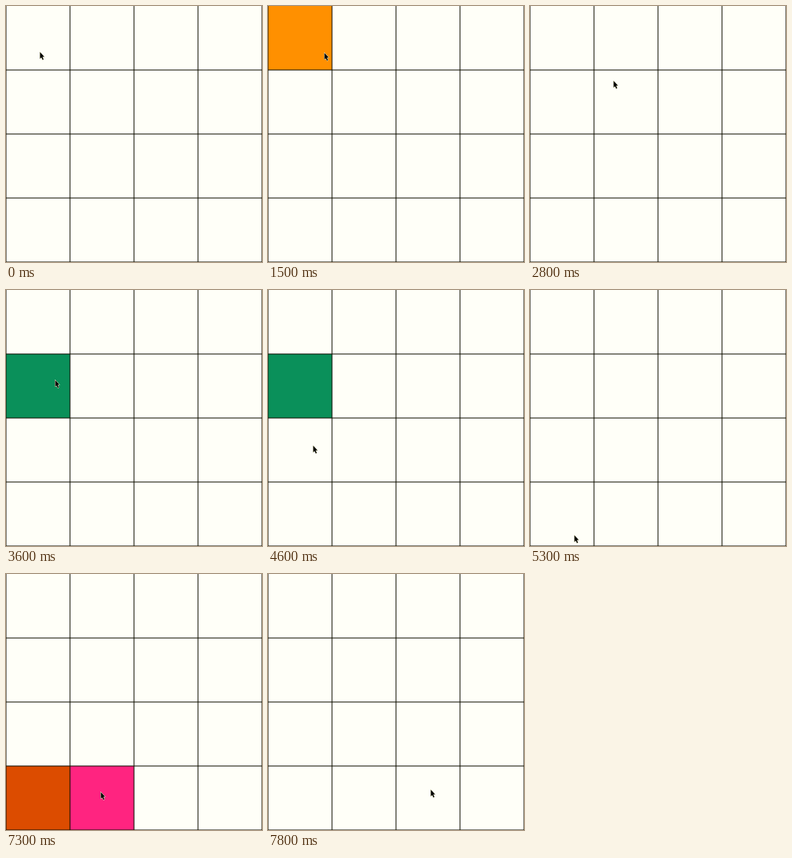
Write an HTML page with a canvas that moves like this. It is 320 px wide and 320 px high and loops after 8 s.

```html
<!DOCTYPE html>
<html lang="en">
<head>
<meta charset="utf-8">
<title>Memory grid</title>
<style>
  html, body { margin: 0; width: 320px; height: 320px; overflow: hidden; background: #fffff8; }
  canvas { display: block; }
</style>
</head>
<body>
<canvas id="board" width="320" height="320"></canvas>
<script>
const ctx = document.getElementById('board').getContext('2d');
const LOOP = 8000, STEP = 100, CELL = 80, SIZE = 320, SHOWN = 500;

const card = (col, row, color, flip) => ({ col, row, color, flip });

// A turn flips two cards; both hide shortly after the second one.
const turns = [
  [card(0, 0, '#ff9000', 800), card(1, 0, '#2070d8', 2300)],
  [card(0, 1, '#0a905a', 3600), card(0, 2, '#8a3cc0', 4800)],
  [card(0, 3, '#dc4c00', 6000), card(1, 3, '#ff2480', 6900)]
];

// Pointer moves are eased curves; "via" bends them.
const home = [42, 57];
const moves = [
  { start: 1400, end: 1800, to: [178, 76], via: [135, 60] },
  { start: 1800, end: 2100, to: [120, 64], via: [165, 118] },
  { start: 2500, end: 3100, to: [61, 112], via: [117, 98] },
  { start: 3900, end: 4600, to: [56, 194], via: [117, 140] },
  { start: 4800, end: 5100, to: [55, 306] },
  { start: 5400, end: 5800, to: [40, 272] },
  { start: 6400, end: 6700, to: [118, 272] },
  { start: 7300, end: 7800, to: [203, 269] }
];

const arrow = new Path2D('M.5 .5V9L2.2 7.2L3.8 10.4L5 9.8L3.6 6.6H6Z');

const ease = p => p * p * (3 - 2 * p);
const bezier = (a, b, c, p) => (1 - p) ** 2 * a + 2 * p * (1 - p) * b + p * p * c;

function pointerAt(t) {
  let from = home;
  for (const { start, end, to, via } of moves) {
    if (t < start) break;
    if (t < end) {
      const p = ease((t - start) / (end - start));
      return from.map((a, i) => bezier(a, via ? via[i] : (a + to[i]) / 2, to[i], p));
    }
    from = to;
  }
  return from;
}

function drawCards(t) {
  for (const turn of turns) {
    const hide = turn[1].flip + SHOWN;
    for (const { col, row, color, flip } of turn) {
      if (t < flip || t >= hide) continue;
      ctx.fillStyle = color;
      ctx.fillRect(col * CELL, row * CELL, CELL, CELL);
    }
  }
}

// Lines sit on pixel edges, so each spreads softly over two pixels.
function drawGrid() {
  ctx.lineWidth = 1;
  ctx.strokeStyle = '#0c0c00';
  ctx.beginPath();
  for (let p = 0; p <= SIZE; p += CELL) {
    ctx.moveTo(p, 0);
    ctx.lineTo(p, SIZE);
    if (!p) continue;
    ctx.moveTo(0, p);
    ctx.lineTo(SIZE, p);
  }
  ctx.stroke();
}

function drawPointer([x, y]) {
  ctx.save();
  ctx.translate(Math.round(x), Math.round(y));
  ctx.lineJoin = 'round';
  ctx.strokeStyle = '#ffffd8';
  ctx.stroke(arrow);
  ctx.fillStyle = '#000';
  ctx.fill(arrow);
  ctx.restore();
}

function draw(t) {
  ctx.fillStyle = '#fffff8';
  ctx.fillRect(0, 0, SIZE, SIZE);
  drawCards(t);
  drawGrid();
  drawPointer(pointerAt(t));
}

const begin = performance.now();
function tick() {
  const t = (performance.now() - begin) % LOOP;
  draw(Math.floor(t / STEP) * STEP);
  requestAnimationFrame(tick);
}
tick();
</script>
</body>
</html>
```
